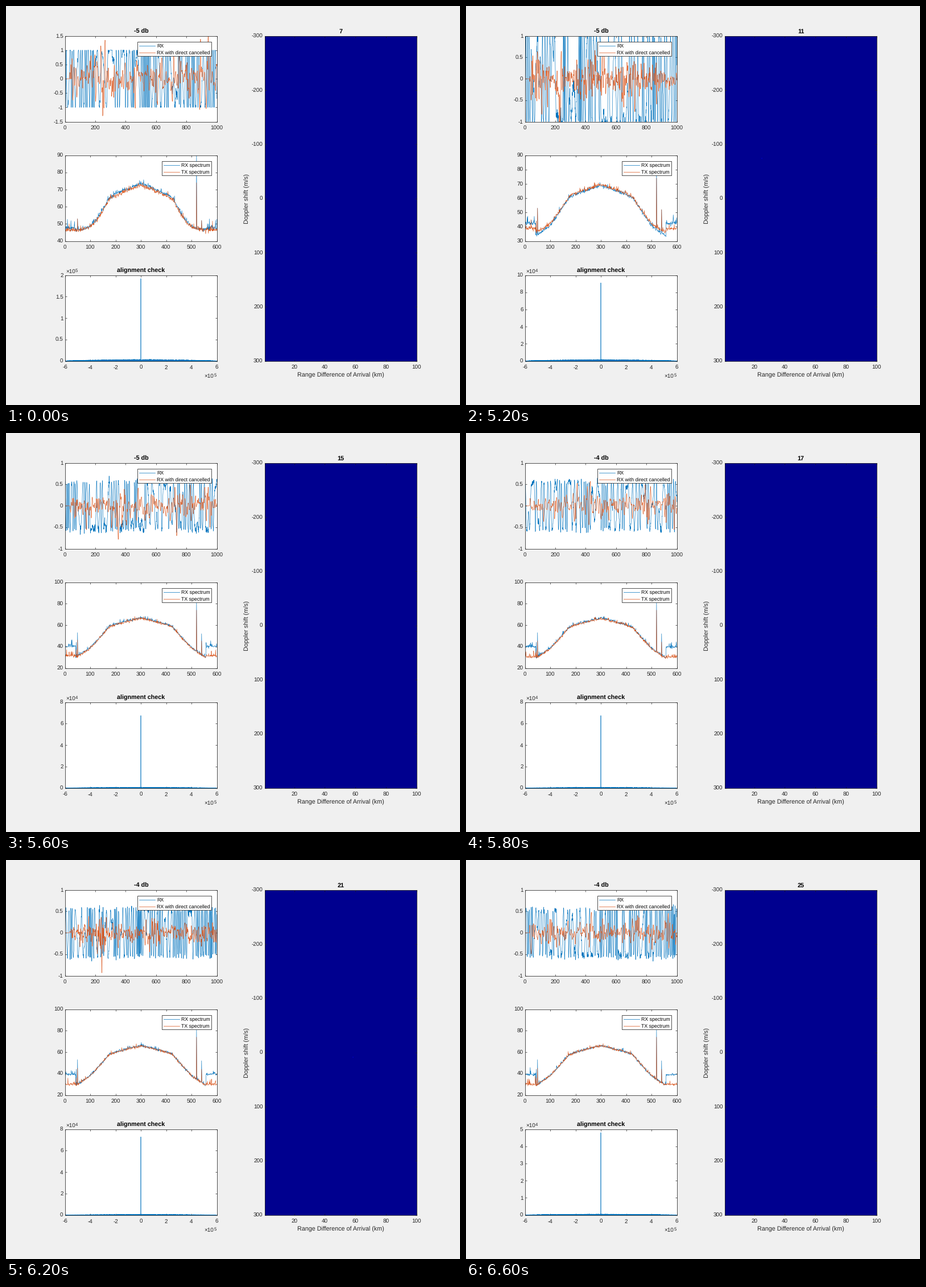
A matplotlib script that plays this animation: 798x702 px, repeating every 6.8 s.

```python
import numpy as np
import matplotlib.pyplot as plt
from matplotlib.animation import FuncAnimation
from matplotlib.patches import Rectangle

W, H = 798, 702
BLUE, ORANGE, INK = "#0072BD", "#D95319", "#262626"
NAVY, SPECK = (0, 0, 0.5608), (0, 0, 0.69)
SCANS = 10
HOLD = 25  # 200 ms steps during which the first scan stays

# Faint echoes on the map: scan index -> stage pixels
SPECKS = {2: [(520, 268)], 3: [(633, 274), (630, 398)], 7: [(610, 347)]}

# Half of the channel's band shape: offset from centre, height 0..1
BAND_X = [0, 40, 100, 125, 160, 200, 255]
BAND_Y = [1, .94, .84, .78, .53, .26, .01]

plt.rcParams.update({
    "font.family": "Liberation Sans",
    "font.size": 9.9,
    "axes.unicode_minus": False,
    "text.hinting": "none",
    "path.simplify": False,
})


def smooth_noise(rng, n, width):
    noise = np.convolve(rng.normal(size=n), np.hanning(width + 2), "same")
    return noise / noise.std()


def time_signals(rng, k):
    n = 1001
    amp = 1.1 if k < 3 else 0.56
    rate = 0.33 + 0.2 * np.cos(2.6 * (k - 2))
    phase = rng.uniform(0, 6) + np.cumsum(rate * (0.7 + 0.6 * smooth_noise(rng, n, 30)))
    rx = np.clip(amp * np.cos(phase) + rng.normal(0, 0.08 * amp, n), -1, 1)

    residual = 0.13 + 0.2 * np.exp(-k / 2)
    envelope = 0.4 + 0.7 * np.abs(smooth_noise(rng, n, 70))
    clean = residual * envelope * smooth_noise(rng, n, int(3 / rate))
    clean[:32] = 0
    return rx, clean


def spectrum(rng, peak, inner, outer, carrier):
    x = np.arange(601)
    hump = peak - 38 + 38 * np.interp(np.abs(x - 300), BAND_X, BAND_Y)
    level = 10 * np.log10(10 ** (hump / 10) + 10 ** (inner / 10))
    edge = np.abs(x - 300) > 257
    level[edge] = outer
    level += rng.normal(0, 0.6, x.size)
    level += (rng.random(x.size) < 0.06) * rng.uniform(0.5, 2.5, x.size)
    level += edge * (rng.random(x.size) < 0.1) * rng.uniform(1, 6, x.size)
    for pos, rise in ((45, 6), (50, 15), (540, 14)):
        level[pos] = max(level[pos], min(outer, 38) + rise)
    level[520] = carrier
    return level


def spectra(rng, k):
    """Both receivers settle from a noisy start to their quiet floors."""
    fade, drop = np.exp(-k / 2), np.exp(-(k / 2.5) ** 2)
    rx = spectrum(rng, 66 + 7.5 * fade, 22 + 24 * fade, 39 + 8.5 * fade, 82 + 10 * fade)
    tx = spectrum(rng, 66 + 6.5 * drop, 22 + 24 * drop, 30 + 16.5 * drop, 74)
    return rx, tx


def correlation(rng, k, top, power):
    x = np.linspace(-6, 6, 4001)
    base = (0.06 + 0.34 * np.exp(-(k / 2) ** 2)) * 10.0 ** (4 - power)
    y = base * np.sqrt(1 - np.abs(x) / 6) * rng.uniform(0, 1, x.size)
    y[::2] *= 0.1
    y[2000] = top * (0.9 + 0.06 * np.cos(2 * np.pi * k / (SCANS - 1)))
    return x, y


def y_ticks(k):
    """Tick values of the three left plots and the lowest plot's exponent."""
    limit = 1.5 if k < 2 else 1
    signal = np.arange(-limit, limit + 0.1, 0.5)
    spec = np.arange(20, 101, 20) if k > 2 else np.arange(30 if k else 40, 91, 10)
    if k == 0:
        return (signal, spec, np.arange(0, 2.1, 0.5)), 5
    if k == SCANS - 1:
        return (signal, spec, np.arange(6)), 4
    return (signal, spec, np.arange(0, 11 if k == 2 else 9, 2)), 4


def gain(k):
    return -4 if k > 4 else -7 if k == 3 else -5


fig = plt.figure(figsize=(W / 72, H / 72), dpi=72, facecolor="#F0F0F0")


def add_plot(x, y, width, height, xlim, xticks, face="white"):
    ax = fig.add_axes([x / W, 1 - (y + height) / H, width / W, height / H])
    ax.set(xlim=xlim, xticks=xticks, facecolor=face)
    ax.xaxis.set_major_formatter("{x:g}")
    ax.yaxis.set_major_formatter("{x:g}")
    ax.tick_params(direction="in", top=True, right=True, length=2.7, width=0.7,
                   color=INK, labelcolor=INK)
    ax.tick_params(axis="x", pad=7.5)
    ax.tick_params(axis="y", pad=3)
    for spine in ax.spines.values():
        spine.set(color=INK, linewidth=0.8)
    return ax


signal_ax = add_plot(103.5, 52.5, 267, 151, (0, 1000), range(0, 1001, 200))
spec_ax = add_plot(103.5, 262.5, 267, 151, (0, 600), range(0, 601, 100))
corr_ax = add_plot(103.5, 473.5, 267, 151, (-6, 6), range(-6, 7, 2))
map_ax = add_plot(454.5, 52.5, 267, 572, (0.5, 100), range(20, 101, 20), NAVY)
map_ax.set(ylim=(300, -300), yticks=range(-300, 301, 100))

# Overlay in stage pixels for text, legends and specks
page = fig.add_axes([0, 0, 1, 1], zorder=5)
page.set(xlim=(0, W), ylim=(H, 0))
page.axis("off")


def label(x, y, text, size=9.9, color=INK, **kw):
    return page.text(x, y, text, fontsize=size, color=color, **kw)


def title(x, y, text=""):
    return label(x, y, text, 10.7, "black", ha="center", weight="bold")


def legend(x, y, width, names):
    page.add_patch(Rectangle((x - .5, y - .5), width, 25, fc="white", ec=INK, lw=0.8))
    for row, (name, color) in enumerate(zip(names, (BLUE, ORANGE))):
        mid = y + 7 + 12 * row
        page.plot([x + 3, x + 31], [mid, mid], color=color, lw=0.7)
        label(x + 34, mid + 3, name, 8.8, "black")


gain_title = title(237.5, 48)
scan_title = title(588.5, 48)
title(237.5, 469, "alignment check")
label(588.5, 653, "Range Difference of Arrival (km)", 10.7, ha="center")
label(424, 339.5, "Doppler shift (m/s)", 10.7, rotation=90, ha="center", va="center")
label(105, 471, "×10")
exponent = label(122, 467.5, "", 7.8)
label(348.5, 655, "×10")
label(366, 651.5, "5", 7.8)
legend(231, 63, 130, ("RX", "RX with direct cancelled"))
legend(274, 273, 87, ("RX spectrum", "TX spectrum"))


def trace(ax, color):
    return ax.plot([], [], color=color, lw=0.6, solid_joinstyle="round")[0]


rx_line, clean_line = trace(signal_ax, BLUE), trace(signal_ax, ORANGE)
rx_spec, tx_spec = trace(spec_ax, BLUE), trace(spec_ax, ORANGE)
corr_line = trace(corr_ax, BLUE)
specks, = page.plot([], [], "s", color=SPECK, ms=2, mew=0)


def draw(step):
    k = max(0, step - HOLD + 1)
    rng = np.random.default_rng(100 + k)
    ticks, power = y_ticks(k)
    for ax, values in zip((signal_ax, spec_ax, corr_ax), ticks):
        ax.set_yticks(values)
        ax.set_ylim(values[0], values[-1])

    lines = (rx_line, clean_line, rx_spec, tx_spec)
    for line, y in zip(lines, (*time_signals(rng, k), *spectra(rng, k))):
        line.set_data(np.arange(y.size), y)
    corr_line.set_data(*correlation(rng, k, ticks[2][-1], power))

    exponent.set_text(str(power))
    gain_title.set_text(f"{gain(k)} db")
    scan_title.set_text(str(7 + 2 * k))
    spots = SPECKS.get(k, [])
    specks.set_data([x for x, _ in spots], [y for _, y in spots])


anim = FuncAnimation(fig, draw, frames=HOLD + SCANS - 1, interval=200,
                     init_func=lambda: draw(0), repeat=True, repeat_delay=0)
plt.show()
```
